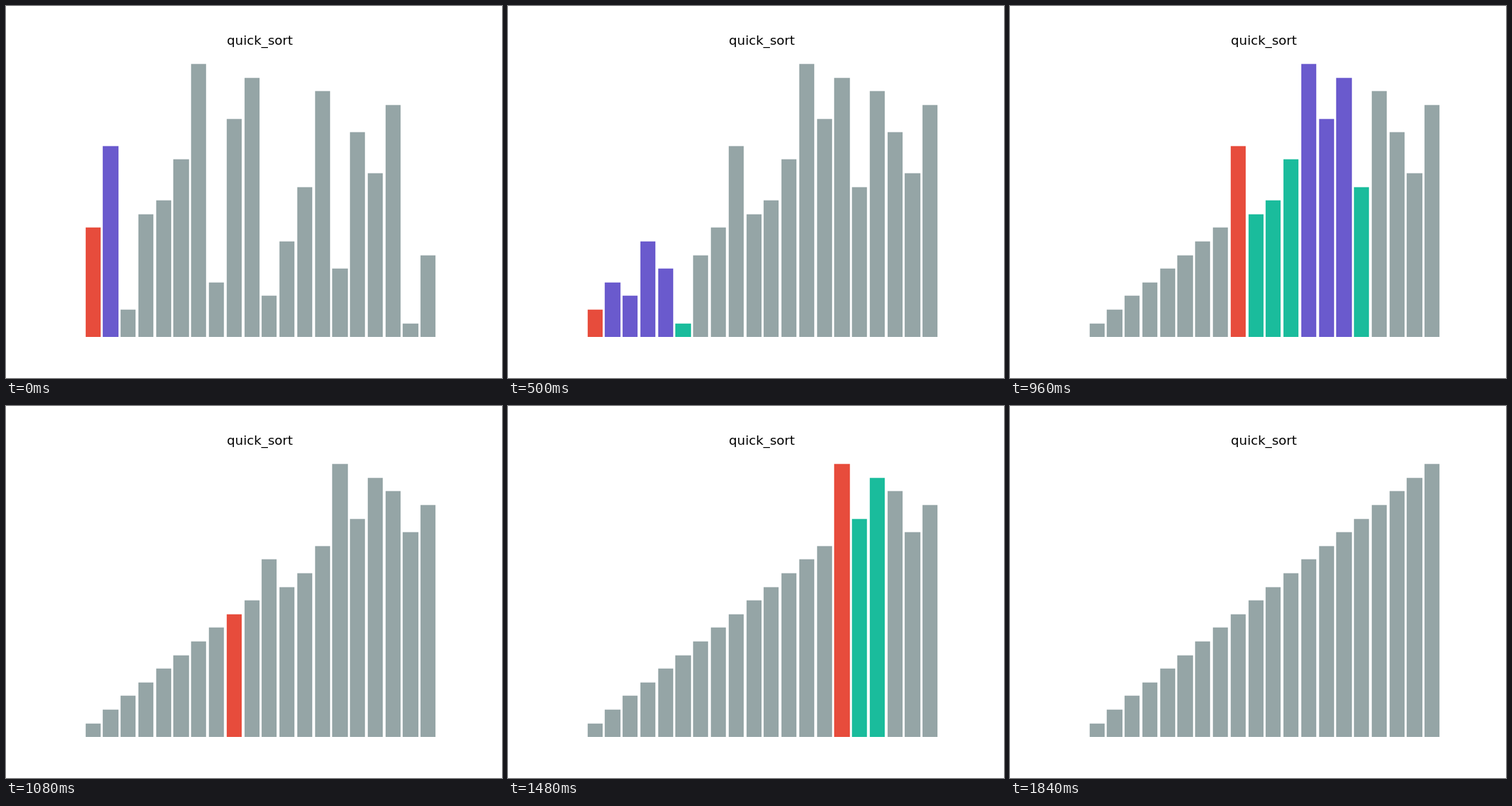
Animation of 640x480 px, one loop 1860 ms. Source, as an HTML page with a canvas:

```html
<!DOCTYPE html>
<html lang="en">
<head>
<meta charset="utf-8">
<title>quick_sort</title>
<style>
  html, body { margin: 0; width: 100%; height: 100%; overflow: hidden; background: #fff; }
  canvas { display: block; }
</style>
</head>
<body>
<canvas id="stage" width="640" height="480"></canvas>
<script>
const ctx = document.getElementById('stage').getContext('2d');
const STEP = 20;
const GREY = '#95a5a6', RED = '#e74c3c', GREEN = '#1abc9c', PURPLE = '#6a5acd';

const values = [8, 14, 2, 9, 10, 13, 20, 4, 16, 19, 3, 7, 11, 18, 5, 15, 12, 17, 1, 6];
const bars = values.map(value => ({ value, color: GREY }));
const states = [];

const save = () => states.push(bars.map(bar => ({ ...bar })));
const clearColors = () => bars.forEach(bar => { bar.color = GREY; });

// Stable quick sort on [from, to), recording every step.
function quickSort(from, to) {
  if (to - from < 2) return;
  const pivot = bars[from], less = [], more = [];
  pivot.color = RED;
  save();
  for (const bar of bars.slice(from + 1, to)) {
    const smaller = bar.value < pivot.value;
    bar.color = smaller ? GREEN : PURPLE;
    (smaller ? less : more).push(bar);
    save();
  }
  bars.splice(from, to - from, ...less, pivot, ...more);
  save();
  clearColors();
  const mid = from + less.length;
  quickSort(from, mid);
  quickSort(mid + 1, to);
}

quickSort(0, bars.length);
save();
states.shift(); // playback opens on the first comparison

// Plot geometry: 5% margins, bars 0.8 units wide, edges snapped to pixel centres.
const plot = { left: 80, width: 496, top: 57.6, bottom: 427.2 };
const unitX = plot.width / (19.8 * 1.1);
const unitY = (plot.bottom - plot.top) / 21;
const firstX = plot.left + 0.99 * unitX;
const snap = v => Math.floor(v + 0.5) + 0.5;

function drawBar({ value, color }, i) {
  const x = firstX + i * unitX;
  const left = snap(x), right = snap(x + 0.8 * unitX);
  const top = snap(plot.bottom - value * unitY), base = snap(plot.bottom);
  ctx.fillStyle = ctx.strokeStyle = color;
  ctx.beginPath();
  ctx.rect(left, top, right - left, base - top);
  ctx.fill();
  ctx.stroke();
}

function draw(time) {
  const step = Math.floor(time / STEP + 1e-6) % states.length;
  ctx.fillStyle = '#fff';
  ctx.fillRect(0, 0, 640, 480);

  ctx.fillStyle = '#000';
  ctx.font = '16.667px "DejaVu Sans", sans-serif';
  ctx.fillText('quick_sort', 285, 50);

  ctx.save();
  ctx.beginPath();
  ctx.rect(80, 58, 496, 369);
  ctx.clip();
  ctx.lineWidth = 100 / 72;
  states[step].forEach(drawBar);
  ctx.restore();
}

const start = performance.now();
function tick() {
  draw(performance.now() - start);
  requestAnimationFrame(tick);
}
tick();
</script>
</body>
</html>
```
